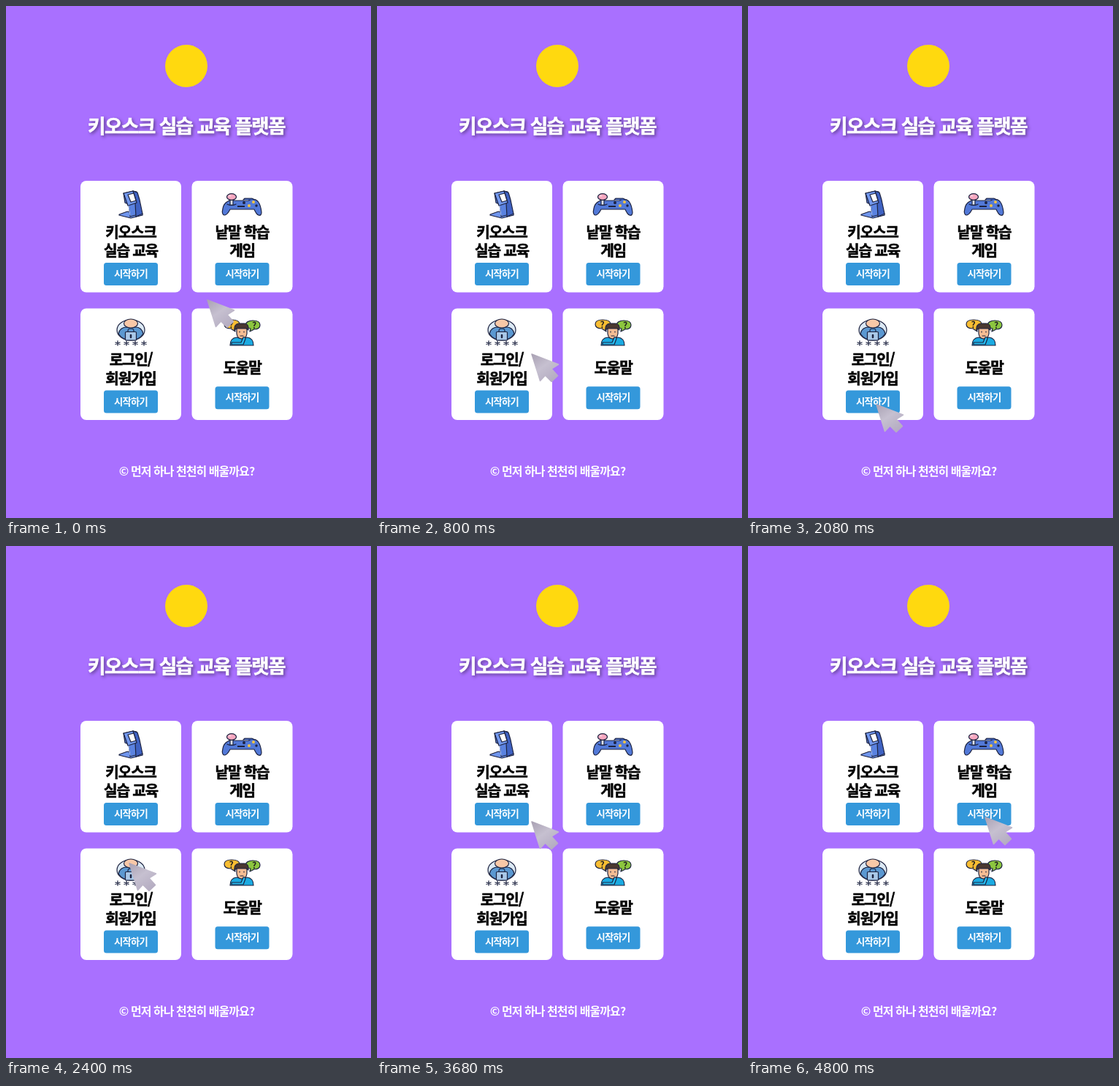
Write an HTML page that moves like this. It is 500 px wide and 700 px high and loops after 5600 ms.

```html
<!DOCTYPE html>
<html lang="ko">
<head>
<meta charset="utf-8">
<title>키오스크 실습 교육 플랫폼</title>
<style>
  html, body { margin: 0; width: 100%; height: 100%; overflow: hidden; background: #a970ff; }
  svg { display: block; }
  text {
    font: 700 20.2px "Noto Sans CJK KR", "Noto Sans CJK JP", "Noto Sans CJK", sans-serif;
    letter-spacing: -.06em;
    text-anchor: middle;
  }
  .title { font-size: 26.7px; fill: #fff; stroke: #fff; stroke-width: .6; filter: drop-shadow(2px 2px 2px rgba(0, 0, 0, .42)); }
  .heading { fill: #000; stroke: #000; stroke-width: .5; }
  .label { font-size: 13.33px; fill: #fff; }
  .footer { font-size: 16px; fill: #fff; }
  .mark { font-size: 12px; letter-spacing: 0; fill: #222; }
  .icon { stroke: #1d2340; stroke-width: 1.2; stroke-linejoin: round; stroke-linecap: round; }
  .icon text, .plain { stroke: none; }
</style>
</head>
<body>
<svg width="500" height="700" viewBox="0 0 500 700">
  <defs>
    <linearGradient id="metal" x1="0" y1="0" x2=".7" y2="1">
      <stop offset="0" stop-color="#aaa2b4"/>
      <stop offset=".5" stop-color="#c6c0d0"/>
      <stop offset="1" stop-color="#b5adc2"/>
    </linearGradient>
  </defs>

  <circle cx="247" cy="82" r="29" fill="#ffd90f"/>
  <text class="title" x="247" y="174">키오스크 실습 교육 플랫폼</text>
  <g id="cards"></g>

  <!-- kiosk -->
  <g class="icon" stroke-width="1">
    <path d="M155 285l11-4 21 3v2l-16 4-16-4z" fill="#6f95ec"/>
    <path d="M161 256l13-3 5 1-1 7 3 24-11 3-2-17-5-2z" fill="#5b83e0"/>
    <path d="M174 253l6 2 3 10 4 19-9 4-1-19z" fill="#3f62c2"/>
    <path d="M161 256l13-3 5 16-12 4z" fill="#7298ee"/>
    <path d="M167 258l8-2 3 10-7 2z" fill="#fff"/>
    <path d="M168 273l2 13" stroke="#9dbaf7"/>
  </g>

  <!-- game controller -->
  <g class="icon">
    <path d="M304 267q4-3 9-1h19q8-4 13 1q4 5 5 15q0 5-4 4q-3-1-6-8h-33q-4 8-8 8q-4-1-2-9q1-7 7-10z" fill="#5279d8"/>
    <path d="M303 271q6 3 12 0" fill="none"/>
    <path d="M307 265h4v7h-4z" fill="#dce5f7"/>
    <ellipse cx="309" cy="261" rx="6.5" ry="4.3" fill="#f7a8c0"/>
    <path d="M325 265l2-2h10l3 2" fill="#3558b0"/>
    <g class="plain">
      <ellipse cx="306.5" cy="259.5" rx="2" ry="1" fill="#fdd4df"/>
      <circle cx="326" cy="269" r="2" fill="#1d2340"/>
      <circle cx="333" cy="273" r="2" fill="#f4c542"/>
      <circle cx="339" cy="268" r="2" fill="#f4c542"/>
      <circle cx="343" cy="273" r="1.7" fill="#1d2340"/>
      <path d="M317 273h10v2h-10z" fill="#1d2340"/>
    </g>
  </g>

  <!-- sign-in -->
  <g class="icon">
    <ellipse cx="171" cy="443" rx="19" ry="14" fill="#dce9f5"/>
    <path d="M154 448q2-9 12-9h11q9 0 11 9q-6 9-17 9t-17-9z" fill="#5b98d1"/>
    <ellipse cx="171" cy="434" rx="9.5" ry="6" fill="#f9c8a7"/>
    <path d="M167 446v-2q0-3 4-3t4 3v2" fill="none"/>
    <rect x="163.5" y="445.500" width="15" height="11.500" rx="1" fill="#a9c8e8"/>
    <path d="M171 450v3" stroke-width="2.500"/>
    <g id="stars" fill="none" stroke-width="1.300"></g>
  </g>

  <!-- help -->
  <g class="icon">
    <path d="M309 429c7 0 11 2 11 6s-4 6-7 6l1 4-6-4c-6 0-9-2-9-6s4-6 10-6z" fill="#f9bd32"/>
    <path d="M338 430c7 0 10 2 10 6s-3 6-8 6l-6 3 1-4c-4 0-7-2-7-5s4-6 10-6z" fill="#8cc63f"/>
    <path d="M307 464q0-10 9-11l7 2 7-2q9 1 9 11z" fill="#1cabe2"/>
    <path d="M316 440h14v8q-1 7-7 7t-7-7z" fill="#f6bd93"/>
    <path d="M313 443q-1-8 6-9h8q6 1 5 9l-3-2h-13z" fill="#49372f"/>
    <path d="M309 460h13l3-7q3-1 3 2l-3 8h-16z" fill="#25b9ee"/>
    <path d="M320 445v1M326 445v1M321 451h4" fill="none"/>
    <text class="mark" x="308.500" y="439.500">?</text>
    <text class="mark" x="340" y="440.500">?</text>
  </g>

  <text class="footer" x="247.500" y="642">© 먼저 하나 천천히 배울까요?</text>
  <path id="pointer" d="M1 1L37.500 15 28 21 36.500 30.500 28 38.500 19.500 30 12.500 37.500z"
        fill="url(#metal)" stroke="url(#metal)" stroke-width="1.500" stroke-linejoin="round"/>
</svg>
<script>
  const byId = id => document.getElementById(id);

  // Left edge, top edge, button top, then [line, baseline] pairs
  const cards = [
    [102, 239, 351, ["키오스크", 316.5], ["실습 교육", 342]],
    [254.5, 239, 351, ["낱말 학습", 316.5], ["게임", 342]],
    [102, 413.5, 525.5, ["로그인/", 491], ["회원가입", 516.5]],
    [254.5, 413.5, 520.3, ["도움말", 502]],
  ];
  byId("cards").innerHTML = cards.map(([x, y, buttonY, ...lines]) => `
    <rect x="${x}" y="${y}" width="138" height="152.5" rx="8" fill="#fff"/>
    ${lines.map(([line, base]) => `<text class="heading" x="${x + 69}" y="${base}">${line}</text>`).join("")}
    <rect x="${x + 32}" y="${buttonY}" width="74" height="31" rx="3.5" fill="#3498db"/>
    <text class="label" x="${x + 69}" y="${buttonY + 20}">시작하기</text>`).join("");

  byId("stars").innerHTML = [153, 165, 177, 189].map(x =>
    `<path d="M${x} 458v6m-3-4l6 2.500m0-2.500l-6 2.500"/>`).join("");

  // Pointer tip at each step; null hides it
  const STEP = 800;
  const stops = [[275, 401], [211, 475], [175, 544], [168, 433], [211, 376], null, [324, 370]];
  const pointer = byId("pointer");

  function draw() {
    const stop = stops[Math.floor(performance.now() / STEP) % stops.length];
    pointer.style.visibility = stop ? "visible" : "hidden";
    if (stop) pointer.setAttribute("transform", `translate(${stop})`);
    requestAnimationFrame(draw);
  }
  draw();
</script>
</body>
</html>
```
